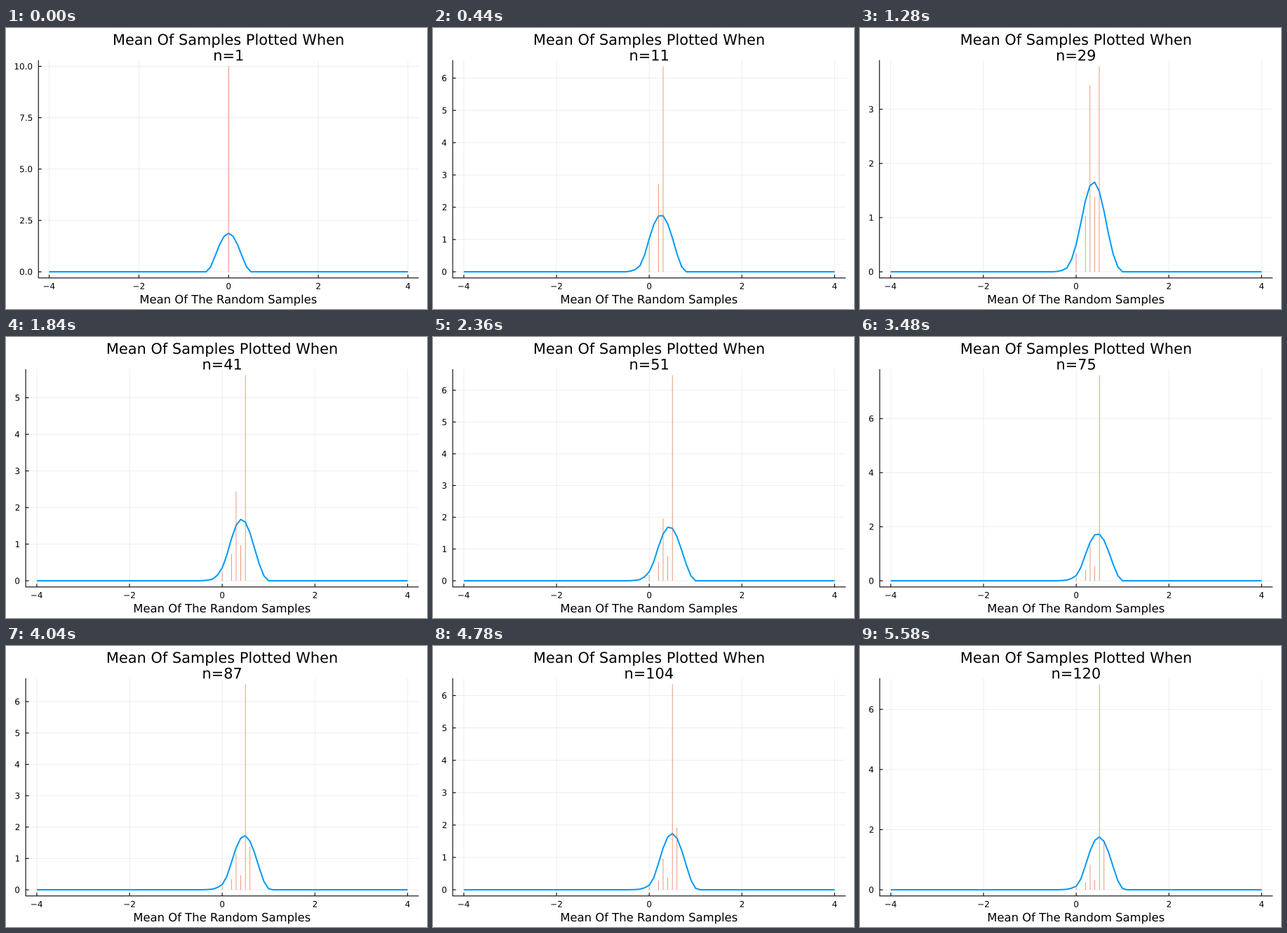
Recreate the animation shown at these times as a matplotlib script. Size 600 by 400 pixels, loop 5680 ms.

```python
import numpy as np
import matplotlib.pyplot as plt
from matplotlib.animation import FuncAnimation
from matplotlib.patches import PathPatch
from matplotlib.path import Path
from matplotlib.textpath import TextPath

plt.rcParams["font.family"] = "DejaVu Sans"

W, H, DPI = 600, 400, 100
PT = 72 / DPI
TOP, BOTTOM, RIGHT = 45.8, 355.8, 588.2
TITLE, GUIDE, TICK = 20.9, 16.42, 11.94   # font sizes in pixels
LABEL_GAP, TICK_LEN = 9.0, 4.5
BLUE, ORANGE = "#009afa", "#e26f46"

# Running means rounded to one decimal, as (tenths, repeats).
RUNS = [(0, 1), (2, 3), (3, 10), (4, 4), (5, 57), (6, 20), (5, 25)]
MEANS = np.concatenate([[t / 10] * k for t, k in RUNS])
GRID = np.linspace(-4, 4, 81)
BANDWIDTH = 0.5

# Time is counted in 20 ms ticks; every third sample holds for 100 ms.
HOLD = np.tile([1, 5, 1], 40)
HOLD[-1] = 5
SAMPLE = np.repeat(np.arange(1, 121), HOLD)

fig = plt.figure(figsize=(W / DPI, H / DPI), dpi=DPI, facecolor="white")
ax = fig.add_axes([0, 0, 1, 1])
ax.set_xlim(0, W)
ax.set_ylim(H, 0)
ax.axis("off")

glyphs = {}


def outline(text, size):
    """Text outline, its left edge and its ink width."""
    key = text, size
    if key not in glyphs:
        p = TextPath((0, 0), text, size=size)
        xs = p.vertices[p.codes != Path.CLOSEPOLY, 0]
        glyphs[key] = p, xs.min(), np.ptp(xs)
    return glyphs[key]


def write(x, y, text, size, align=0.5):
    p, left, width = outline(text, size)
    verts = p.vertices * [1, -1] + [x - left - align * width, y]
    ax.add_patch(PathPatch(Path(verts, p.codes), fc="black", lw=0, zorder=4))


def line(xs, ys, width, color="black", **kw):
    ax.plot(xs, ys, color=color, lw=width * PT, snap=False,
            solid_capstyle="butt", **kw)


def density(data):
    u = (GRID[:, None] - data) / BANDWIDTH
    k = np.where(np.abs(u) < 1, 15 / 16 * (1 - u**2) ** 2, 0)
    return k.mean(axis=1) / BANDWIDTH


def y_ticks(limit):
    step = 2.5 if limit >= 10 else 2 if limit >= 7 else 1
    ticks = np.arange(0, limit, step)
    form = "{:.1f}" if step == 2.5 else "{:.0f}"
    return [(t, form.format(t)) for t in ticks]


def draw(i):
    n = SAMPLE[i]
    for artist in [*ax.lines, *ax.patches]:
        artist.remove()

    data = MEANS[:n]
    values, counts = np.unique(data, return_counts=True)
    heights = 10 * counts / n
    peak = heights.max()
    ticks = y_ticks(1.03 * peak)

    left = 21.75 + max(outline(s, TICK)[2] for _, s in ticks)
    mid = (left + RIGHT) / 2
    px = lambda x: mid + x * (RIGHT - left) / 8.48
    py = lambda y: BOTTOM - (y / peak + 0.03) * (BOTTOM - TOP) / 1.06

    for t in range(-4, 5, 2):
        x = px(t)
        line([x, x], [TOP, BOTTOM], 1, alpha=0.07)
        line([x, x], [BOTTOM, BOTTOM - TICK_LEN], 1.1)
        write(x, 371.7, str(t).replace("-", "\u2212"), TICK)
    for t, label in ticks:
        y = py(t)
        line([left, RIGHT], [y, y], 1, alpha=0.07)
        line([left, left + TICK_LEN], [y, y], 1.1)
        write(left - LABEL_GAP, y + 0.365 * TICK, label, TICK, align=1)
    line([left, left, RIGHT], [TOP, BOTTOM, BOTTOM], 1.1)

    line(px(GRID), py(density(data)), 2, BLUE, zorder=3,
         solid_joinstyle="round")
    for v, h in zip(values, heights):
        line([px(v)] * 2, [py(0), py(h)], 0.7, ORANGE, zorder=3)

    write(mid, 23.9, "Mean Of Samples Plotted When", TITLE)
    write(mid, 46.3, f"n={n}", TITLE)
    write(mid, 392, "Mean Of The Random Samples", GUIDE)
    return []


anim = FuncAnimation(fig, draw, frames=len(SAMPLE), interval=20,
                     repeat=True, repeat_delay=0, blit=False)
plt.show()
```
